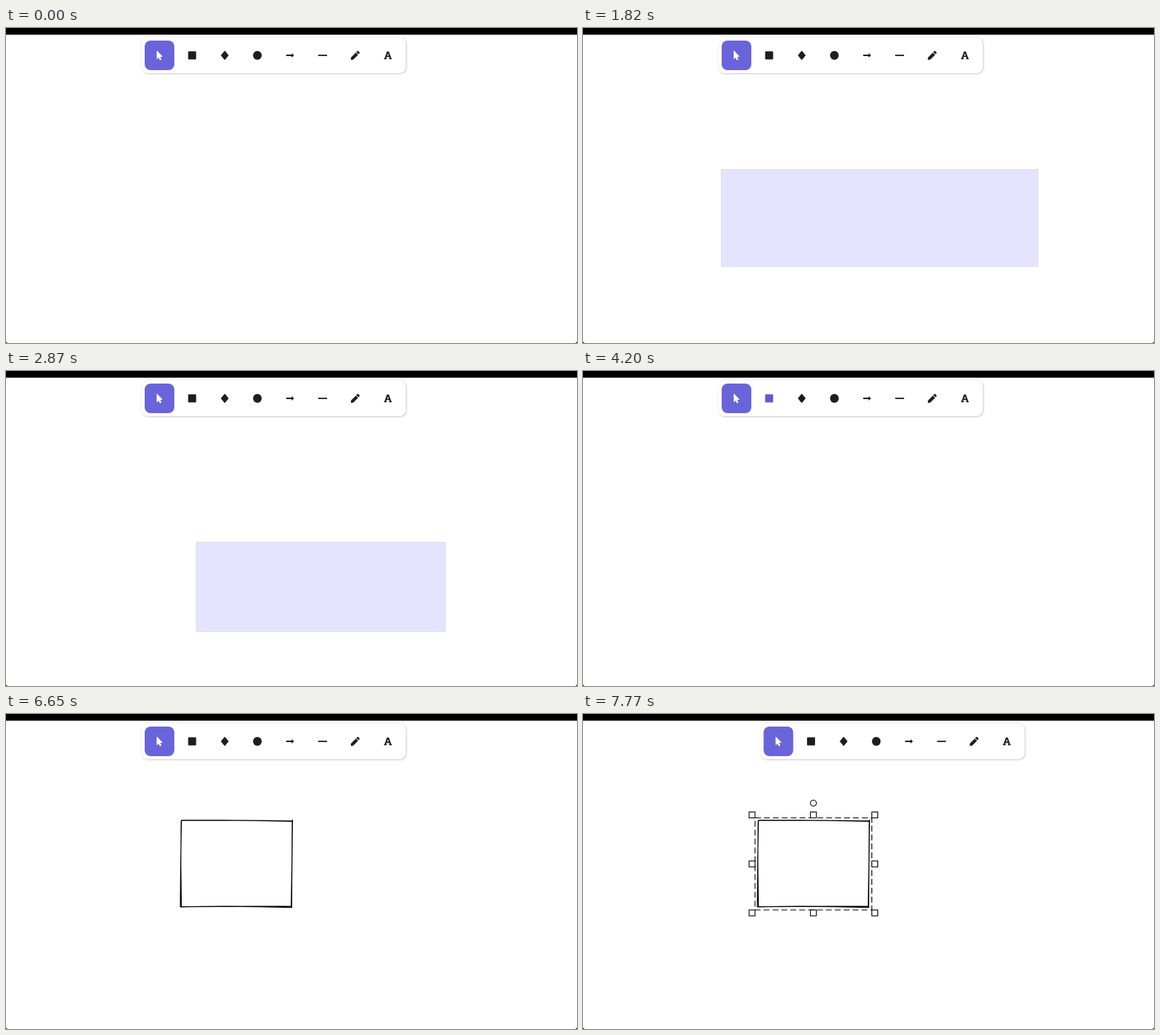
These frames come from a looping animation (770 by 426 pixels, 9.24 s). An HTML page with a canvas:

```html
<!DOCTYPE html>
<html lang="en">
<head>
<meta charset="utf-8">
<title>Whiteboard</title>
<style>
  html, body { margin: 0; width: 100%; height: 100%; overflow: hidden; background: #000; }
  canvas { display: block; }
</style>
</head>
<body>
<canvas id="stage" width="770" height="426"></canvas>
<script>
const ctx = document.getElementById('stage').getContext('2d');
const LOOP = 9240, STEP = 70;
const INK = '#1e1e22', ACCENT = '#6a64da', HOVER = '#5f5cce';

// Tool icons, each centred on 0,0
const ICONS = [
  'M-3.8-5.6Q-3.8-6.5-3-5.9L3.7 1Q4.1 1.9 3.4 2L1 2L2.4 5.3Q2.4 5.8 2 5.9L.9 6.4Q.3 6.5.1 6L-1.1 3L-3.1 5Q-3.8 5.3-3.8 4.6Z',
  'M-4.2-5.4H4.2Q5.4-5.4 5.4-4.2V4.2Q5.4 5.4 4.2 5.4H-4.2Q-5.4 5.4-5.4 4.2V-4.2Q-5.4-5.4-4.2-5.4Z',
  'M-.6-5.8Q0-6.4.6-5.8L4.9-.6Q5.3 0 4.9.6L.6 5.8Q0 6.4-.6 5.8L-4.9.6Q-5.3 0-4.9-.6Z',
  'M-5.9 0A5.9 5.9 0 1 1 5.9 0A5.9 5.9 0 1 1-5.9 0Z',
  'M-5.2-.9H2.1V-2.3Q2.2-3 2.8-2.6L5.2-.3Q5.4 0 5.2.3L2.8 2.6Q2.2 3 2.1 2.3V.9H-5.2Z',
  'M-6-.9H6V.9H-6Z',
  'M.8-3.8L3.8-.8L-2.7 5.7L-5.4 6Q-6 6-6 5.4L-5.7 2.7ZM5.6-4.3Q6.3-3.5 5.6-2.7L4.3-1.4L1.3-4.4L2.6-5.7Q3.4-6.3 4.2-5.7Z',
  'M-1.3-5.2H1.3L4.5 3.7H5.2V5.2H1.5V3.7H2.4L1.8 2.2H-1.8L-2.4 3.7H-1.5V5.2H-5.2V3.7H-4.5ZM-1.1.4H1.1L0-2.7Z'
].map(d => new Path2D(d));

// Pointer paths of the four marquee drags: [time, x, y], anchored at the first point
const DRAGS = [
  [[1050, 614, 323], [1610, 173, 170], [1820, 186, 191]],
  [[2380, 256, 231], [2730, 594, 363], [2870, 593, 353]],
  [[3500, 346, 238], [3990, 263, 168]],
  [[7210, 165, 304], [7700, 445, 108]]
];

const mix = (a, b, p) => a + (b - a) * p;
const within = (t, from, to) => t >= from && t < to;

function pointerAt(path, t) {
  const i = Math.max(1, path.findIndex(k => t <= k[0]));
  const [t0, x0, y0] = path[i - 1], [t1, x1, y1] = path[i];
  const u = (t - t0) / (t1 - t0), p = u * u * (3 - 2 * u);
  return [mix(x0, x1, p), mix(y0, y1, p)];
}

function roundRect(x, y, w, h, r, fill) {
  ctx.beginPath();
  ctx.roundRect(x, y, w, h, r);
  ctx.fillStyle = fill;
  ctx.fill();
}

function toolbar(left, active, hover) {
  ctx.save();
  ctx.shadowColor = 'rgba(0,0,0,.24)';
  ctx.shadowBlur = 3;
  ctx.shadowOffsetX = ctx.shadowOffsetY = 0.8;
  roundRect(left, 13, 356, 48, 8, '#fff');
  ctx.restore();
  ICONS.forEach((icon, i) => {
    const x = left + 4 + i * 44;
    if (i === active) roundRect(x, 17, 40, 40, 8, ACCENT);
    ctx.save();
    ctx.translate(x + 20, 37);
    ctx.fillStyle = i === active ? '#fff' : i === hover ? HOVER : INK;
    ctx.fill(icon, 'evenodd');
    ctx.restore();
  });
}

function marquee([, ax, ay], [px, py]) {
  const x = Math.round(Math.min(ax, px)), y = Math.round(Math.min(ay, py));
  const w = Math.round(Math.abs(px - ax)), h = Math.round(Math.abs(py - ay));
  ctx.fillStyle = '#e4e4ff';
  ctx.fillRect(x, y, w, h);
  ctx.strokeStyle = '#dedeef';
  ctx.lineWidth = 1;
  ctx.strokeRect(x + 0.5, y + 0.5, w - 1, h - 1);
}

function sketchLine(x0, y0, x1, y1, bendX, bendY) {
  ctx.moveTo(x0, y0);
  ctx.quadraticCurveTo((x0 + x1) / 2 + bendX, (y0 + y1) / 2 + bendY, x1, y1);
}

// Hand-drawn box: two loose strokes for each side
function sketchBox(l, t, r, b) {
  ctx.beginPath();
  sketchLine(l, t, r, t + 1.2, 0, -1.6);
  sketchLine(l + 0.6, t - 0.4, r - 0.5, t + 0.6, 0, -0.6);
  sketchLine(r + 0.4, t - 1.2, r - 0.8, b, -0.3, 0);
  sketchLine(r, t + 0.4, r - 1.4, b - 0.6, 0.6, 0);
  sketchLine(r, b + 0.7, l - 0.6, b - 0.2, 0, -2);
  sketchLine(r - 0.4, b - 0.8, l, b - 0.4, 0, -0.6);
  sketchLine(l + 0.6, t, l - 0.9, b + 0.3, -0.6, 0);
  sketchLine(l + 0.2, t + 0.4, l + 0.5, b - 0.5, -1.2, 0);
  ctx.strokeStyle = '#000';
  ctx.lineWidth = 1.2;
  ctx.stroke();
}

function selectionFrame() {
  ctx.strokeStyle = '#000';
  ctx.fillStyle = '#fff';
  ctx.lineWidth = 1.1;
  ctx.setLineDash([8, 4]);
  ctx.strokeRect(232, 140.5, 157.5, 124.5);
  ctx.setLineDash([]);
  for (const x of [228, 310.7, 393.5]) for (const y of [136.5, 202.8, 269]) {
    if (x === 310.7 && y === 202.8) continue;
    ctx.fillRect(x - 4, y - 4, 8, 8);
    ctx.strokeRect(x - 4, y - 4, 8, 8);
  }
  ctx.beginPath();
  ctx.arc(310.7, 120.5, 4, 0, 7);
  ctx.fill();
  ctx.stroke();
}

function draw(t) {
  ctx.fillStyle = '#000';
  ctx.fillRect(0, 0, 770, 426);
  roundRect(0, 9, 770, 417, [0, 0, 3, 3], '#fff');

  let enclosed = t >= 7770;
  for (const path of DRAGS) {
    if (!within(t, path[0][0] + STEP, path[path.length - 1][0] + STEP)) continue;
    const pointer = pointerAt(path, t);
    marquee(path[0], pointer);
    if (t > 7000) enclosed = pointer[0] > 387 && pointer[1] < 143;
  }

  if (t >= 5390) {
    const u = Math.min(1, (t - 5320) / 630);
    const p = 1 - (1 - u ** 1.3) ** 3.2;
    sketchBox(mix(386, 236, p), 144, 386, mix(144, 261, p));
  }
  if (enclosed || within(t, 6020, 6650)) selectionFrame();

  const shifted = enclosed || within(t, 4620, 6650);
  const hover = within(t, 4200, 4620) ? 1 : within(t, 4690, 4830) ? 0 : -1;
  toolbar(shifted ? 239.5 : 183, within(t, 4620, 6020) ? 1 : 0, hover);
}

const start = performance.now();
function tick() {
  const t = (performance.now() - start) % LOOP;
  draw(Math.floor(t / STEP) * STEP);
  requestAnimationFrame(tick);
}
tick();
</script>
</body>
</html>
```
